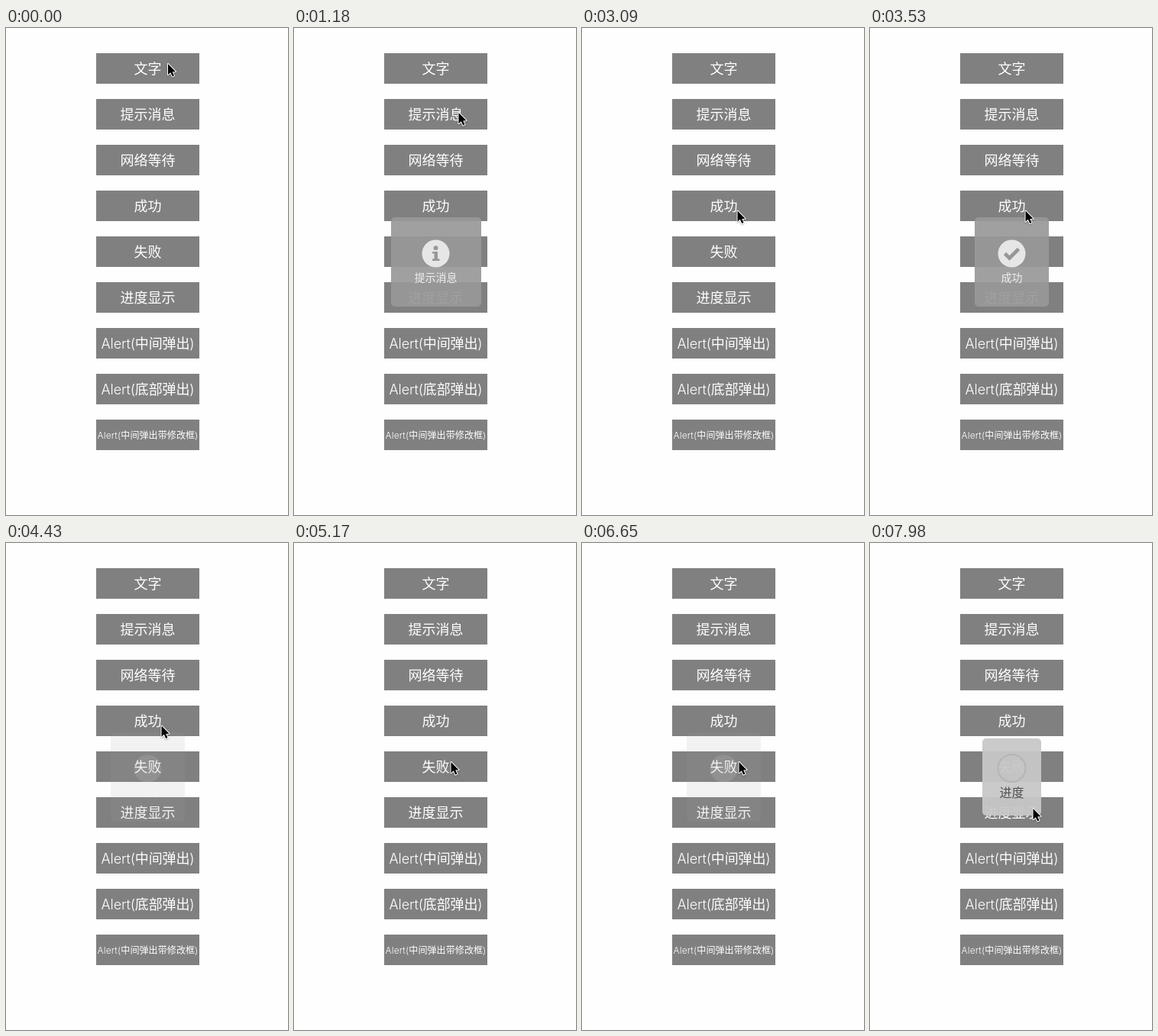
Animation of 369 by 638 pixels, one loop 8 s. Source, as an HTML page with a canvas:

```html
<!DOCTYPE html>
<html lang="zh-CN">
<head>
<meta charset="utf-8">
<style>
html, body { margin: 0; width: 100%; height: 100%; overflow: hidden; background: #fefefe; }
canvas { display: block; width: 369px; height: 638px; }
</style>
</head>
<body>
<canvas id="stage"></canvas>
<script>
const W = 369, H = 638, LOOP = 8000, CX = 185.5;
const FONT = 'Inter, "Noto Sans CJK SC", "Noto Sans CJK", sans-serif';
const canvas = document.getElementById('stage');
const ratio = window.devicePixelRatio || 1;
canvas.width = Math.round(W * ratio);
canvas.height = Math.round(H * ratio);
const ctx = canvas.getContext('2d');
ctx.scale(ratio, ratio);

const labels = ['文字', '提示消息', '网络等待', '成功', '失败', '进度显示',
  'Alert(中间弹出)', 'Alert(底部弹出)', 'Alert(中间弹出带修改框)'];

// The pointer moves in discrete steps along a quadratic curve.
const moves = [
  { start: 150, end: 730, steps: 5, from: [211, 46], via: [214, 78], to: [214.5, 110] },
  { start: 2510, end: 3090, steps: 5, from: [214.5, 110], via: [190, 265], to: [202.5, 238.5] },
  { start: 4880, end: 5170, steps: 3, from: [202.5, 238.5], via: [203, 262], to: [204.5, 286] },
  { start: 6945, end: 7680, steps: 6, from: [204.5, 286], via: [208, 320], to: [212.5, 347] }
];

// Keys are [time, opacity] pairs, held until the next one.
const popups = [
  { text: '提示消息', icon: infoIcon, x: 127, w: 118, keys: [[1180, 1], [2070, .13], [2220, 0]] },
  { text: '成功', icon: checkIcon, x: 137, w: 97, keys: [[3390, .5], [3530, 1], [4430, .13], [4580, 0]] },
  { text: '失败', icon: crossIcon, x: 137, w: 97, keys: [[5620, .5], [5760, 1], [6650, .13], [6800, 0]] }
];

function text(str, y, size, color, weight = 350, spacing = 0) {
  ctx.font = `${weight} ${size}px ${FONT}`;
  ctx.letterSpacing = spacing + 'px';
  ctx.textAlign = 'center';
  ctx.fillStyle = color;
  ctx.fillText(str, CX, y + size * .375);
}

function panel(x, y, w, h, color) {
  ctx.fillStyle = color;
  ctx.beginPath();
  ctx.roundRect(x, y, w, h, 5);
  ctx.fill();
}

function polyline(points, width) {
  ctx.beginPath();
  points.forEach(([x, y]) => ctx.lineTo(x, y));
  ctx.lineWidth = width;
  ctx.stroke();
}

function infoIcon() {
  ctx.beginPath();
  ctx.arc(0, -7.3, 2.9, 0, 7);
  ctx.fill();
  ctx.fillRect(-4.5, -2.5, 7, 2.5);
  ctx.fillRect(-2, -2.5, 4.5, 11);
  ctx.fillRect(-4.5, 7, 9.5, 2.5);
}

function checkIcon() {
  polyline([[-9, 0], [-3, 6], [9, -6]], 4.6);
}

function crossIcon() {
  polyline([[-7, -7], [7, 7]], 4.6);
  polyline([[7, -7], [-7, 7]], 4.6);
}

function drawPopup(p, t) {
  const key = p.keys.filter(k => k[0] <= t).pop();
  if (!key || !key[1]) return;
  ctx.save();
  ctx.globalAlpha = key[1];
  panel(p.x, 248, p.w, 117, 'rgba(152,152,152,.92)');
  ctx.save();
  ctx.translate(CX, 295.5);
  ctx.fillStyle = '#e6e6e6';
  ctx.beginPath();
  ctx.arc(0, 0, 18, 0, 7);
  ctx.fill();
  ctx.fillStyle = ctx.strokeStyle = '#979797';
  p.icon();
  ctx.restore();
  text(p.text, 326.5, 14, '#eeeeee');
  ctx.restore();
}

function drawProgress() {
  panel(147, 256, 77, 101, 'rgba(199,199,199,.94)');
  ctx.strokeStyle = '#b5b5b5';
  ctx.lineWidth = 2;
  ctx.beginPath();
  ctx.arc(CX, 295, 18, 0, 7);
  ctx.stroke();
  text('进度', 326.5, 16, '#505050', 500);
}

function pointerAt(t) {
  const m = moves.filter(v => v.start <= t).pop();
  if (!m) return moves[0].from;
  const gap = (m.end - m.start) / (m.steps - 1);
  const p = Math.min(1, (Math.floor((t - m.start) / gap + .02) + 1) / m.steps);
  const u = p * p * (3 - 2 * p), v = 1 - u;
  return m.from.map((a, i) => v * v * a + 2 * u * v * m.via[i] + u * u * m.to[i]);
}

function drawPointer([x, y]) {
  ctx.save();
  ctx.translate(x + 1, y + 1);
  ctx.beginPath();
  [[0, 0], [0, 14.2], [3.3, 11.2], [5.7, 16.6], [8, 15.6], [5.7, 10.4], [10, 10.2]]
    .forEach(([a, b]) => ctx.lineTo(a, b));
  ctx.closePath();
  ctx.lineJoin = 'round';
  ctx.lineWidth = 2;
  ctx.strokeStyle = '#fff';
  ctx.shadowColor = 'rgba(0,0,0,.3)';
  ctx.shadowBlur = 2 * ratio;
  ctx.shadowOffsetY = ratio;
  ctx.stroke();
  ctx.shadowColor = 'transparent';
  ctx.fillStyle = '#000';
  ctx.fill();
  ctx.restore();
}

function draw(t) {
  ctx.fillStyle = '#fefefe';
  ctx.fillRect(0, 0, W, H);
  labels.forEach((label, i) => {
    const y = 33 + i * 60;
    ctx.fillStyle = '#808080';
    ctx.fillRect(118, y, 135, 40);
    if (i === 8) text(label, y + 20.5, 12, '#fff', 350, .1);
    else text(label, y + 20.5, 18, '#fff', 350, i > 5 ? -.15 : 0);
  });
  popups.forEach(p => drawPopup(p, t));
  if (t >= 7980) drawProgress();
  drawPointer(pointerAt(t));
}

const origin = performance.now();
function tick() {
  draw((performance.now() - origin) % LOOP);
  requestAnimationFrame(tick);
}
tick();
</script>
</body>
</html>
```
